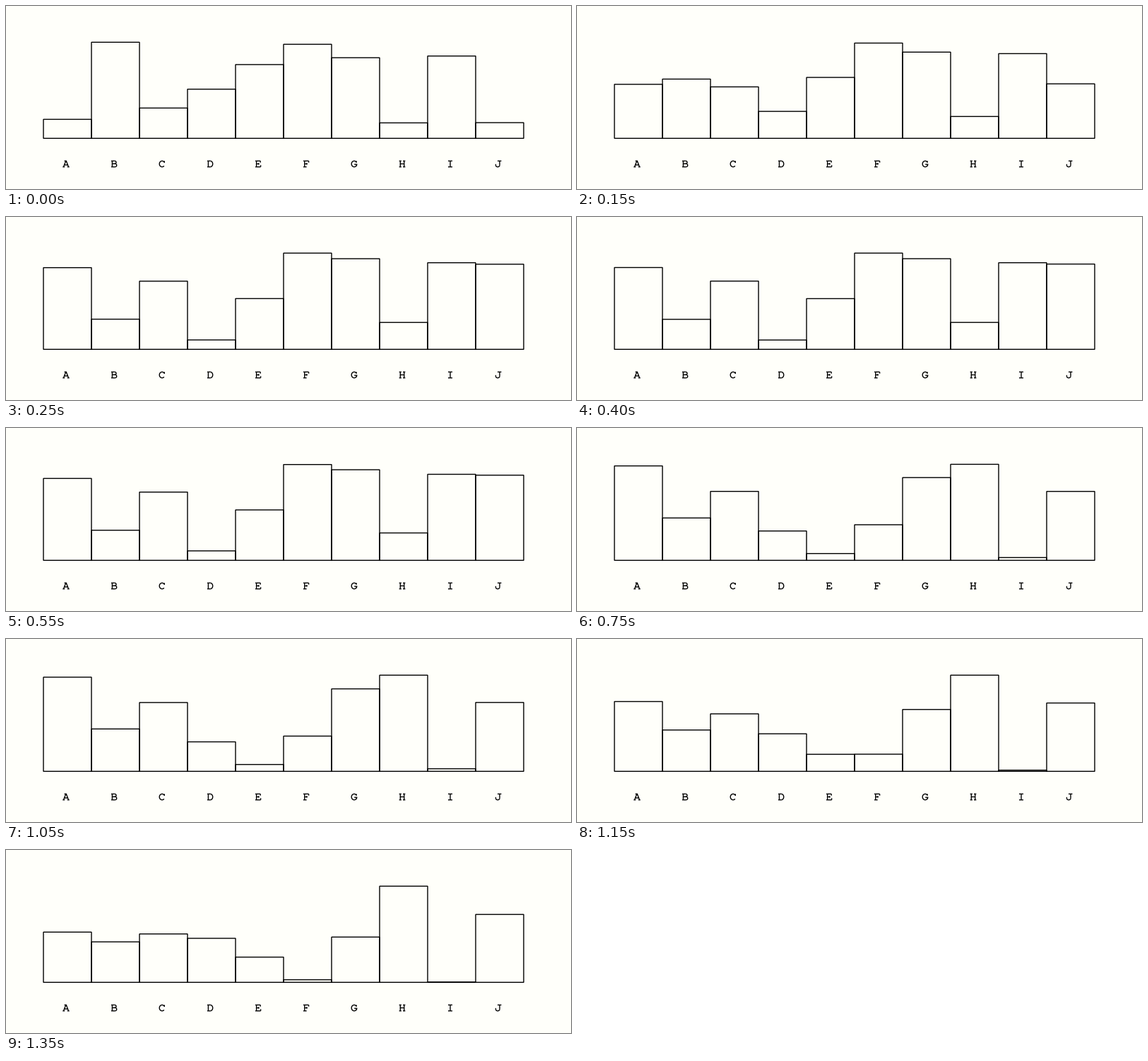
These frames come from a looping animation (800x259 px, 1500 ms). A matplotlib script:

```python
import numpy as np
import matplotlib.pyplot as plt
from matplotlib.animation import FuncAnimation
from matplotlib.collections import LineCollection
from matplotlib.patches import Rectangle

W, H, DPI = 800, 259, 64
PX = 72 / DPI            # points per pixel
STEP, FRAMES = 50, 30    # ms per frame, frames per loop
LEFT, BAR, BASE = 53, 68, 187.3
PERIOD, DURATION, LEAD = 500, 250, 30
INK, PAPER = "#000000", "#fffffa"

# bar tops, one row per data set
TOPS = np.array([
    [160.4, 51.3, 144.4, 117.7, 82.9, 54.2, 73.2, 165.4, 70.8, 165.1],
    [71.5, 144.8, 90.7, 174.1, 115.5, 51.1, 59, 149.2, 64.7, 66.6],
    [53.6, 127.3, 89.7, 145.7, 177.8, 137.1, 70.2, 51.2, 183.6, 89.8],
    [116.2, 130, 118.8, 125, 151.6, 183.6, 123.2, 51.2, 187.2, 91.2],
])


def row(y, a, b):
    return [(a, y), (b, y)]


def col(x, a, b):
    return [(x, a), (x, b)]


def arc(x, y, rx, ry, a, b):
    t = np.radians(np.linspace(a, b, 24))
    return list(zip(x + rx * np.cos(t), y + ry * np.sin(t)))


def stem(x):
    return [col(x, 0, 9), row(0, x - 1.6, x + 1.6), row(9, x - 1.6, x + 1.6)]


# typewriter capitals as strokes, baseline at 0, cap height 9
GLYPHS = {
    "A": [[(-3.5, 0), (-.3, 9), (.3, 9), (3.5, 0)], row(3, -2.4, 2.4),
          row(0, -4.7, -1.9), row(0, 1.9, 4.7), row(9, -2.4, .3)],
    "B": [col(-2.6, 0, 9), row(0, -4, 1.2), row(9, -4, .8),
          row(4.8, -2.6, 1), arc(.8, 6.9, 2.2, 2.1, -90, 90),
          arc(1.2, 2.4, 2.5, 2.4, -90, 90)],
    "C": [arc(0, 4.5, 3.8, 4.5, 35, 318), col(3.3, 6.3, 9)],
    "D": [col(-2.6, 0, 9), row(0, -4, .2), row(9, -4, .2),
          arc(.2, 4.5, 3.5, 4.5, -90, 90)],
    "E": [col(-2.4, 0, 9), row(0, -4, 3.6), row(9, -4, 3.2),
          row(4.6, -2.4, .8), col(.8, 3.3, 6), col(3.6, 0, 2.6),
          col(3.2, 6.6, 9)],
    "F": [col(-2.2, 0, 9), row(0, -4, .6), row(9, -4, 3.6),
          row(4.6, -2.2, 1), col(1, 3.3, 6), col(3.6, 6.6, 9)],
    "G": [arc(0, 4.5, 3.8, 4.5, 35, 325), row(3.8, .2, 4.4),
          col(3.4, 1.2, 3.8), col(3.1, 6.5, 9)],
    "H": stem(-2.7) + stem(2.7) + [row(4.6, -2.7, 2.7)],
    "I": [col(0, 0, 9), row(0, -3, 3), row(9, -3, 3)],
    "J": [row(9, -1, 4.4), col(2, 2.6, 9),
          arc(-.8, 2.6, 2.8, 2.6, 180, 360), col(-3.6, 2.6, 4.2)],
}


def ease(t):
    """Cubic in and out."""
    t = min(max(t, 0), 1)
    return 4 * t ** 3 if t < .5 else 1 - 4 * (1 - t) ** 3


def tops_at(ms):
    y = TOPS[0]
    for k, target in enumerate(TOPS[1:]):
        start = STEP + k * PERIOD
        if ms >= start:
            y = y + (target - y) * ease((ms - start + LEAD) / DURATION)
    return y


fig = plt.figure(figsize=(W / DPI, H / DPI), dpi=DPI, facecolor=PAPER)
ax = fig.add_axes([0, 0, 1, 1])
ax.set_xlim(0, W)
ax.set_ylim(H, 0)
ax.axis("off")

bars = []
for i, strokes in enumerate(GLYPHS.values()):
    bar = Rectangle((LEFT + i * BAR, BASE), BAR, 0, fill=False, ec=INK,
                    lw=1.4 * PX, joinstyle="miter", snap=False)
    bars.append(ax.add_patch(bar))
    center = LEFT + 32 + i * BAR
    lines = [[(center + x, 227.7 - .93 * y) for x, y in s] for s in strokes]
    ax.add_collection(LineCollection(lines, colors=INK, linewidths=1.4 * PX,
                                     snap=False), autolim=False)


def draw(n):
    for bar, y in zip(bars, tops_at(n * STEP)):
        bar.set_y(y)
        bar.set_height(BASE - y)
    return bars


anim = FuncAnimation(fig, draw, frames=FRAMES, interval=STEP, repeat=True,
                     repeat_delay=0)
plt.show()
```
